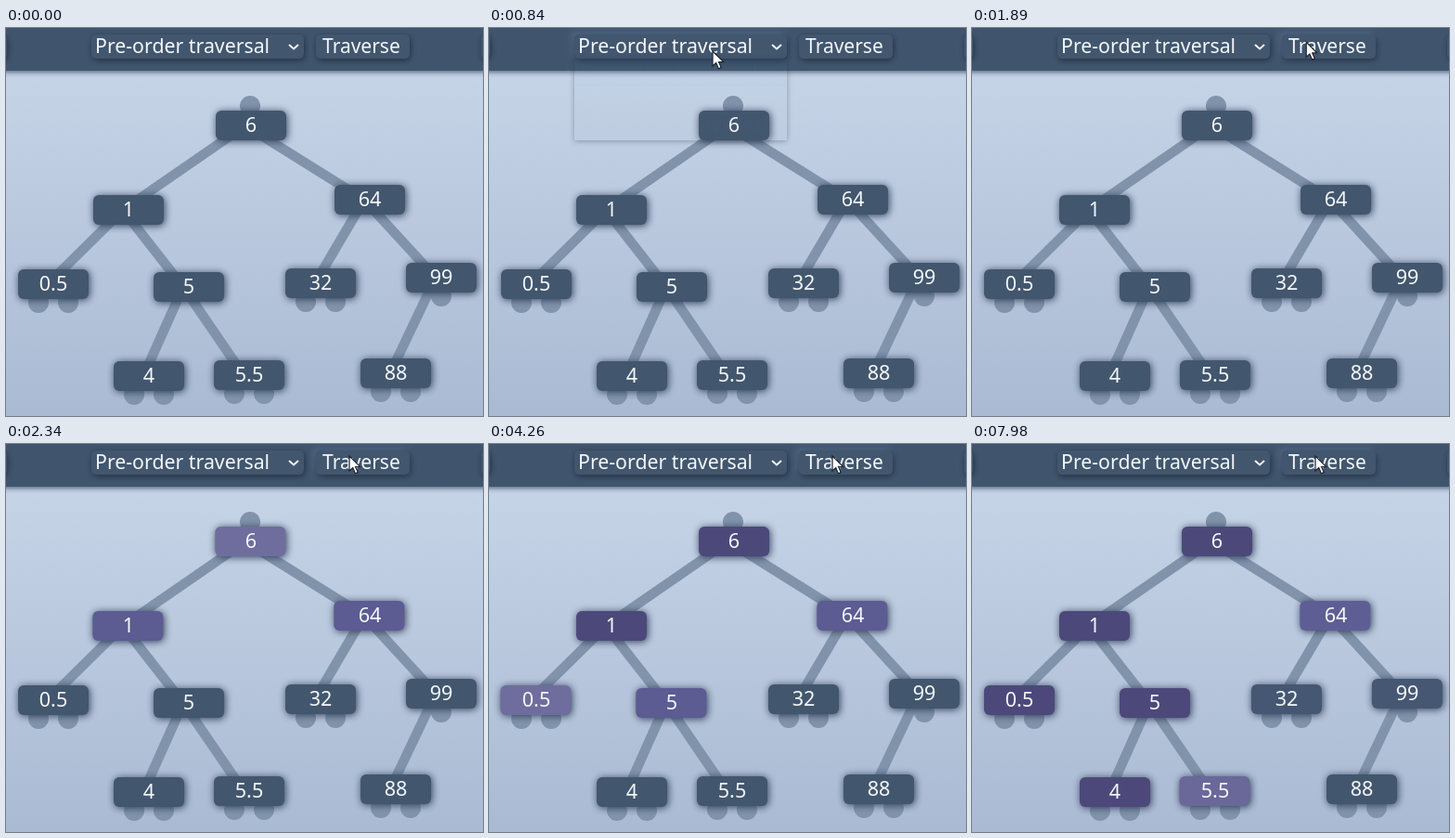
An HTML page with a canvas for the animation above (8000 ms loop, 514 px wide and 418 px high).

```html
<!DOCTYPE html>
<html lang="en">
<head>
<meta charset="utf-8">
<title>Tree traversal</title>
<style>
html, body { margin: 0; width: 100%; height: 100%; overflow: hidden; background: #b7c6dc; }
canvas { display: block; }
</style>
</head>
<body>
<canvas id="stage" width="514" height="418"></canvas>
<script>
const ctx = document.getElementById('stage').getContext('2d');
const W = 514, H = 418, LOOP = 8000;
const NODE_W = 76, NODE_H = 32;
const MENU = [92, 33, 229, 88];
const FONT = '"Noto Sans", "Open Sans", sans-serif';
const BASE = [66, 86, 110], QUEUED = [92, 91, 146], CURRENT = [111, 109, 157], VISITED = [76, 73, 122];
const LINK = '#8193ab';
const PORTS = { L: 22, C: 38, R: 54 };

// Nodes in pre-order: label, left, top, parent index, free child ports
const nodes = [
  ['6', 226, 89, -1, ''],
  ['1', 94, 180, 0, ''],
  ['0.5', 13, 260, 1, 'LR'],
  ['5', 159, 263, 1, ''],
  ['4', 116, 359, 3, 'LR'],
  ['5.5', 224, 358, 3, 'LR'],
  ['64', 354, 169, 0, ''],
  ['32', 301, 259, 6, 'LR'],
  ['99', 431, 253, 6, 'C'],
  ['88', 382, 356, 8, 'LR']
].map(([label, x, y, parent, ports]) => ({ label, x, y, parent, ports, keys: [] }));

// Each visit colours the node, its predecessor and its children
[2220, 3210, 4170, 5100, 6060, 7020, 7980].forEach((time, i) => {
  nodes[i].keys.push([time, CURRENT]);
  if (i) nodes[i - 1].keys.push([time, VISITED]);
  nodes.forEach(n => { if (n.parent === i) n.keys.push([time, QUEUED]); });
});

// Pointer stops: time, x, y
const stops = [
  [270, 465, 70], [800, 241, 25], [930, 241, 25], [1050, 242, 35],
  [1200, 243, 43], [1500, 243, 43], [2040, 370, 13]
];

const clamp = v => Math.max(0, Math.min(1, v));
const smooth = p => p * p * (3 - 2 * p);
const easeOut = p => 1 - (1 - p) * (1 - p);
const mix = (a, b, p) => a + (b - a) * p;
const rgb = c => `rgb(${c.map(Math.round).join(',')})`;

function shadow(color, blur, dx, dy) {
  ctx.shadowColor = color;
  ctx.shadowBlur = blur;
  ctx.shadowOffsetX = dx;
  ctx.shadowOffsetY = dy;
}

const noShadow = () => shadow('transparent', 0, 0, 0);

function box(x, y, w, h, r, fill) {
  ctx.fillStyle = fill;
  ctx.beginPath();
  ctx.roundRect(x, y, w, h, r);
  ctx.fill();
}

function text(str, x, y, size, align = 'left') {
  ctx.font = `500 ${size}px ${FONT}`;
  ctx.textAlign = align;
  ctx.fillStyle = '#f4f7fb';
  ctx.fillText(str, x, y);
}

function dot(x, y) {
  ctx.fillStyle = LINK;
  ctx.beginPath();
  ctx.arc(x, y, 11, 0, Math.PI * 2);
  ctx.fill();
}

function drawBackground() {
  const g = ctx.createLinearGradient(0, 46, 0, H);
  g.addColorStop(0, '#c5d4e6');
  g.addColorStop(1, '#aabad3');
  ctx.fillStyle = g;
  ctx.fillRect(0, 0, W, H);
}

function drawLinks() {
  ctx.strokeStyle = LINK;
  ctx.lineWidth = 10.5;
  for (const n of nodes) {
    const p = nodes[n.parent];
    if (!p) continue;
    ctx.beginPath();
    ctx.moveTo(p.x + 32, p.y + 16);
    ctx.lineTo(n.x + 32, n.y + 16);
    ctx.stroke();
  }
  dot(263, 84);
  for (const n of nodes) {
    for (const port of n.ports) dot(n.x + PORTS[port], n.y + 36);
  }
}

function drawNode(n, t) {
  let color = BASE, shift = 0;
  for (const [time, next] of n.keys) {
    const p = smooth(clamp((t - time + 24) / 100));
    color = color.map((v, i) => mix(v, next[i], p));
    shift = mix(shift, next === VISITED ? 0 : -0.7, p);
  }
  shadow('rgba(38,54,80,0.95)', 9, 1, 1);
  box(n.x + shift, n.y, NODE_W, NODE_H, 6, rgb(color));
  noShadow();
  text(n.label, n.x + 38, n.y + 23, 21.6, 'center');
}

function button(x, w, hover) {
  if (hover) {
    shadow('#56708f', 6, -2, -2);
    box(x, 7, w, 26, 5, rgb(BASE));
  }
  shadow('rgba(28,40,60,0.85)', 7, 1, 2);
  box(x, 7, w, 26, 5, rgb(BASE));
  noShadow();
}

function drawHeader(t) {
  shadow('rgba(45,62,86,0.9)', 6, 0, 1);
  ctx.fillStyle = '#40556d';
  ctx.fillRect(-10, -10, W + 20, 56);
  noShadow();
  button(-40, 41, false);
  button(512, 40, false);
  button(92, 229, t > 760 && t < 1560);
  button(334, 101, t > 1800);
  text('Pre-order traversal', 96, 27, 21.3);
  text('Traverse', 341, 27, 21);
  ctx.strokeStyle = '#f4f7fb';
  ctx.lineWidth = 2;
  ctx.beginPath();
  ctx.moveTo(305, 18);
  ctx.lineTo(310, 22.5);
  ctx.lineTo(315, 18);
  ctx.stroke();
}

// Shadow outside the menu only, so it can appear before the panel
function drawMenuRim(alpha) {
  ctx.save();
  ctx.beginPath();
  ctx.rect(0, 0, W, H);
  ctx.rect(...MENU);
  ctx.clip('evenodd');
  ctx.globalAlpha = alpha;
  shadow('rgba(35,48,70,0.8)', 6, 0, 1);
  box(...MENU, 0, rgb(BASE));
  ctx.restore();
}

function drawMenu(t) {
  const leave = clamp((1590 - t) / 90);
  drawMenuRim(clamp((t - 770) / 150) * leave);
  ctx.globalAlpha = clamp((t - 838) / 140) * leave;
  box(...MENU, 0, rgb(BASE));
  box(93, 33, 227, 30, 0, '#1e90ff');
  text('Pre-order traversal', 98, 55, 21.7);
  text('In-order traversal', 98, 84, 21.7);
  text('Post-order traversal', 98, 112, 21.7);
  ctx.globalAlpha = 1;
}

function drawPointer(t) {
  if (t < stops[0][0]) return;
  let [, x, y] = stops[0];
  for (let i = 1; i < stops.length; i++) {
    const [start] = stops[i - 1], [end, nx, ny] = stops[i];
    const p = easeOut(clamp((t - start) / (end - start)));
    x = mix(x, nx, p);
    y = mix(y, ny, p);
  }
  ctx.save();
  ctx.translate(x, y);
  ctx.beginPath();
  [[0, 0], [0, 16], [3.7, 12.6], [6.4, 18.8], [9.2, 17.6], [6.5, 11.6], [11.5, 11.4]]
    .forEach(([px, py]) => ctx.lineTo(px, py));
  ctx.closePath();
  ctx.fillStyle = '#fff';
  ctx.fill();
  ctx.strokeStyle = '#1c2430';
  ctx.lineWidth = 1.2;
  ctx.stroke();
  ctx.restore();
}

function frame(now) {
  const t = now % LOOP;
  drawBackground();
  drawLinks();
  nodes.forEach(n => drawNode(n, t));
  drawHeader(t);
  drawMenu(t);
  drawPointer(t);
}

let origin = null;
function tick(now) {
  if (origin === null) origin = now;
  frame(now - origin);
  requestAnimationFrame(tick);
}
frame(0);
requestAnimationFrame(tick);
</script>
</body>
</html>
```
